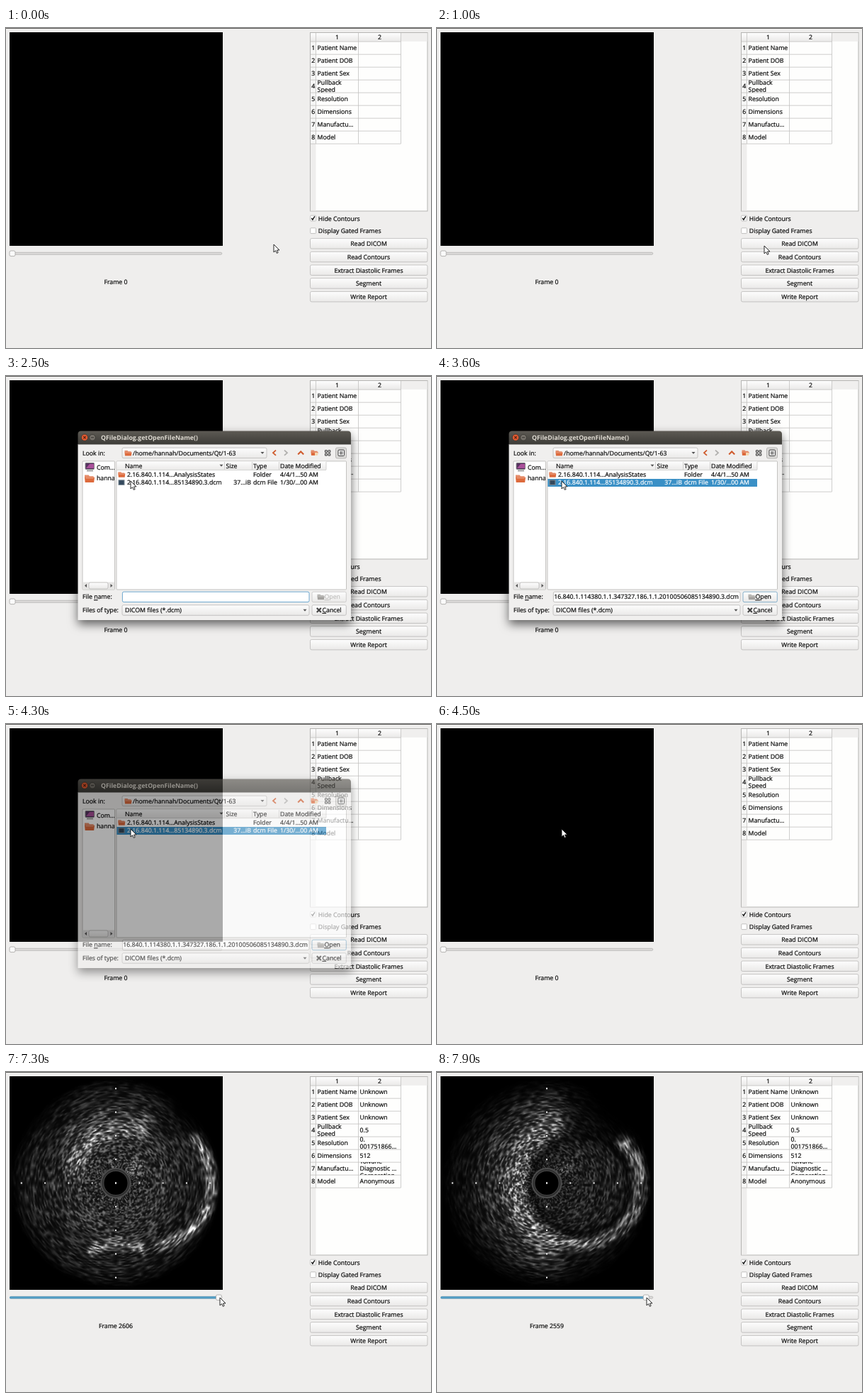
An HTML page with a canvas that plays this animation: 600x451 px, repeating every 8 s.

```html
<!DOCTYPE html>
<html lang="en">
<head>
<meta charset="utf-8">
<title>Ultrasound viewer</title>
<style>
html, body { margin: 0; width: 600px; height: 451px; overflow: hidden; background: #efeeed; }
canvas { position: absolute; left: 5px; top: 6px; background: #000; }
#stage { position: absolute; left: 0; top: 0; }
text { font: 8.75px "Open Sans", "Noto Sans", sans-serif; fill: #0c0c0c; stroke: #0c0c0c; stroke-width: .22; white-space: pre; text-rendering: geometricPrecision; }
.picked text { fill: #fff; stroke: #fff; }
.off text { fill: #b3b2b0; stroke: none; }
text.title { font-weight: 700; fill: #dfdbd2; stroke: none; }
#dialog { filter: drop-shadow(0 6px 7px rgba(0, 0, 0, .6)); }
</style>
</head>
<body>
<canvas id="scan" width="301" height="301"></canvas>
<svg id="stage" width="600" height="451" viewBox="0 0 600 451"></svg>
<script>
const $ = id => document.getElementById(id);
const text = (x, y, s, attrs = '') => `<text x="${x}" y="${y}" ${attrs}>${s}</text>`;
const rect = (x, y, w, h, fill, attrs = '') => `<rect x="${x}" y="${y}" width="${w}" height="${h}" fill="${fill}" ${attrs}/>`;
const line = (d, stroke, w = 1, attrs = '') => `<path d="${d}" fill="none" stroke="${stroke}" stroke-width="${w}" ${attrs}/>`;
const box = (x, y, w, h, fill = '#fff', stroke = '#b9b8b6', r = 2) => rect(x, y, w, h, fill, `stroke="${stroke}" stroke-width=".8" rx="${r}"`);
const button = (x, y, w, h = 14.5) => box(x, y, w, h, 'url(#face)');
const clip = (x, y, w, h, body) => `<svg x="${x}" y="${y}" width="${w}" height="${h}" viewBox="${x} ${y} ${w} ${h}">${body}</svg>`;
const down = (x, y) => `<path d="M${x - 2.5} ${y - 1.2}h5l-2.5 3z" fill="#555"/>`;
const middle = 'text-anchor="middle"', toEnd = 'text-anchor="end"';
const underline = c => `<tspan text-decoration="underline">${c}</tspan>`;
const folder = (x, y, size = 1, fill = '#dd6a3c') =>
  `<g transform="translate(${x} ${y}) scale(${size})"><path d="M0 1h4l1 1.3h4V4H0z" fill="${fill}" opacity=".75"/>` +
  `<path d="M0 3.4h10l-.6 5.1H.5z" fill="${fill}"/><path d="M1 4.2h8" stroke="#fff" stroke-width=".6" opacity=".5"/></g>`;

// ---- main window ----
const labels = ['Patient Name', 'Patient DOB', 'Patient Sex', 'Pullback|Speed', 'Resolution', 'Dimensions', 'Manufactu…', 'Model'];
const values = ['Unknown', 'Unknown', 'Unknown', '0.5', '0.|001751866…', '512', 'Tolvane|Diagnostic …|Corporation', 'Anonymous'];
const ROW = 18;

function cell(x, row, s) {
  const top = 19 + row * ROW, lines = s.split('|');
  const first = top + 12.2 - (lines.length - 1) * 5;
  return clip(x, top, 59, ROW, lines.map((l, i) => text(x + 2, first + i * 10, l)).join(''));
}
const column = (x, items) => items.map((s, i) => cell(x, i, s)).join('');

function table() {
  const numbers = labels.map((_, i) => text(433.8, 31.4 + i * ROW, i + 1, middle)).join('');
  const rules = labels.map((_, i) => `M430 ${37.2 + i * ROW}H557.5`).join('');
  return rect(429.5, 6.5, 165.5, 251.5, '#fefefd', 'stroke="#b5b4b2"') + rect(430, 7, 164.5, 12, '#f0efee') +
    rect(430, 19, 7.5, 238.5, '#efeeed') + rect(430, 7, 127.5, 12, 'url(#face)') + rect(430, 19, 7.5, 144, '#f6f6f5') +
    line('M437.5 7V163M497.5 7V163M557.5 7V163M430 19.2H557.5' + rules, '#c3c2c0', .8) +
    text(467.5, 16.3, 1, middle) + text(527.5, 16.3, 2, middle) + numbers +
    column(437.6, labels) + `<g id="values">${column(497.6, values)}</g>`;
}

const actions = ['Read DICOM', 'Read Contours', 'Extract Diastolic Frames', 'Segment', 'Write Report'].map((s, i) => {
  const y = 296.6 + i * 18.7;
  return button(429.5, y, 165.5) + text(512, y + 10.5, s, middle);
}).join('');
const checkbox = (y, s) => box(429.7, y, 7.8, 7.8, '#fff', '#b4b3b1', 1) + text(440.8, y + 7.5, s);

const mainWindow = rect(0, 0, 600, 1, '#5c5b58') + table() + checkbox(264.2, 'Hide Contours') + checkbox(281.8, 'Display Gated Frames') +
  line('M431.3 268l1.6 2.2 3-4.8', '#111', 1.4) + actions +
  box(5.4, 316.3, 299.4, 3, '#dcdbda', '#b4b3b1', 1.5) + rect(5, 316.2, 0, 3.3, '#529dc4', 'id="fill" rx="1.5"') +
  `<g id="handle">${box(-4, 314, 8, 7.6, '#fafafa', '#a5a4a2')}</g>` + text(155, 360.8, '', `id="label" ${middle}`);

// ---- file dialog ----
const columns = { Name: 171, Size: 346, Type: 349, 'Date Modified': 387 };

function fileRow(i, icon, cells) {
  const y = 142 + i * 11.4;
  const body = Object.values(columns).map((x, k) => text(x, y, cells[k], k === 1 ? toEnd : '')).join('');
  return `<g id="${icon}${i}">${icon === 'file' ? rect(159, y - 6.6, 8, 6.6, '#33485c', 'stroke="#7d8a94"') : folder(158.3, y - 7.8)}${body}</g>`;
}
const rootRows = [['__pycache__', '', 'Folder', '4/10/…03 AM'], ['1-63', '', 'Folder', '4/4/19 4:28 PM'], ['1-97', '', 'Folder', '4/4/1…57 AM']];

function fileList() {
  return box(156, 120, 324.5, 181, '#fff', '#b5b4b2', 1) + rect(156.5, 120.5, 295.5, 12, 'url(#face)') +
    line('M156.5 132.6H452M308.5 121V132M347.5 121V132M385.5 121V132M452 121V132', '#cbcac8', .8) +
    text(168, 130.2, 'Name') + text(310.5, 130.2, 'Size') + text(349, 130.2, 'Type') + text(387, 130.2, 'Date Modified') + down(304, 126) +
    rect(156.4, 145, 295.6, 11, '#3a90c6', 'id="selection"') +
    `<g id="root">${rootRows.map((r, i) => fileRow(i, 'dir', r)).join('')}</g><g id="sub">` +
    fileRow(0, 'sub', ['2.16.840.1.114…AnalysisStates', '', 'Folder', '4/4/1…50 AM']) +
    fileRow(1, 'file', ['2.16.840.1.114…85134890.3.dcm', '37…iB', 'dcm File', '1/30/…00 AM']) + '</g>';
}

const toolbar = line('M381 104.7l-4 3.6 4 3.6', '#aaa', 1.8, 'id="back"') + line('M393 104.7l4 3.6-4 3.6', '#b0afad', 1.8) +
  line('M412.2 110.5l4-4 4 4', '#cf5a2c', 2) + folder(430.5, 103.5) + rect(436, 108, 4, 4, '#f3d7b0') +
  line('M450.5 104.8h2.8v2.8h-2.8zm4.5 0h2.8v2.8H455zm-4.5 4.5h2.8v2.8h-2.8zm4.5 0h2.8v2.8H455z', '#333') +
  box(465.5, 101, 15, 15, '#dcdbd9', '#a9a8a6') + rect(469, 104.2, 8.4, 8.4, '#fff', 'stroke="#333" rx="1"') +
  line('M471 106.8h4.5m-4.5 1.7h4.5m-4.5 1.7h4.5', '#333', .9);

const sidebar = box(108, 120, 45.5, 181, '#fff', '#b5b4b2', 1) + rect(112, 122.5, 12.5, 9, '#55325f', 'rx="1" stroke="#888"') +
  '<path d="M113 130l5-6h6v6z" fill="#a9509a"/>' + rect(114, 132.6, 9, 1.8, '#999') + folder(111, 138, 1.4) +
  clip(108, 120, 45, 170, text(128, 131.8, 'Com…') + text(128, 147.4, 'hannah')) +
  rect(108.5, 290.5, 44.5, 10, '#e6e5e4') + button(117, 291, 27, 9) + '<path d="M114 293v5l-3-2.5zM147.5 293v5l3-2.5z" fill="#555"/>';

const titleBar = '<path d="M101.5 96.5V82q0-4.5 4.5-4.5H482.5q4.5 0 4.5 4.5V96.5z" fill="url(#bar)"/>' +
  '<circle cx="111" cy="86.7" r="4.6" fill="#e25a31" stroke="#33312d" stroke-width=".7"/>' + line('M109.3 85l3.4 3.4m0-3.4l-3.4 3.4', '#5a2413', 1.1) +
  '<circle cx="122" cy="86.7" r="4.3" fill="#75716a" stroke="#33312d" stroke-width=".7"/>' + line('M120 86.7h4', '#3b3935', 1.1) +
  text(134, 90, 'QFileDialog.getOpenFileName()', 'class="title"');

const dialog = rect(101.5, 96, 385.5, 248, '#f0efee') + titleBar + toolbar + sidebar + fileList() +
  text(108, 111.5, 'Look in:') + button(164, 101.2, 204) + folder(167.5, 104) + text(179, 111.5, '', 'id="path"') + down(362, 108.3) +
  text(108, 314.3, `File ${underline('n')}ame:`) + `<g id="field">${box(164.4, 304.2, 263.6, 14.4)}</g>` +
  clip(165.5, 304, 262, 15, text(426, 314.3, '', 'id="fileName"')) +
  `<g id="open">${button(432, 304.2, 48.3)}${folder(439.5, 306.8, 1, '#a3a19e')}${text(449.5, 314.3, underline('O') + 'pen')}</g>` +
  text(108, 333, 'Files of type:') + button(164, 322.8, 264) + text(168, 333, 'DICOM files (*.dcm)') + down(422, 330) +
  button(432, 322.8, 48.3) + line('M438.8 327l6 6m0-6l-6 6', '#444', 2.2) + text(446.5, 333, underline('C') + 'ancel');

$('stage').innerHTML = `<defs>
  <linearGradient id="face" x2="0" y2="1"><stop stop-color="#fdfdfd"/><stop offset="1" stop-color="#eae9e8"/></linearGradient>
  <linearGradient id="bar" x2="0" y2="1"><stop stop-color="#5d5a54"/><stop offset="1" stop-color="#3d3c38"/></linearGradient></defs>` +
  mainWindow + `<g id="dialog">${dialog}</g>` +
  '<path id="cursor" d="M0 0V11L2.6 8.7 4.3 12.4 6.1 11.6 4.5 8H8z" fill="#fff" stroke="#111" stroke-width=".9"/>';

// ---- ultrasound image: soft envelope times polar speckle ----
const CX = 155, CY = 156.5, SIZE = 301;

// Paints blurred arcs and discs; a negative level darkens.
function painter(g) {
  const shade = (level, blur) => {
    g.filter = `blur(${blur}px)`;
    g.fillStyle = g.strokeStyle = level > 0 ? `rgba(255,255,255,${level})` : `rgba(0,0,0,${-level})`;
    g.beginPath();
  };
  return {
    arc(level, x, y, r, from, to, width) {
      shade(level, width * .28);
      g.arc(x, y, r, from * Math.PI / 180, to * Math.PI / 180);
      g.lineWidth = width;
      g.stroke();
    },
    disc(level, x, y, r, blur) {
      shade(level, blur);
      g.arc(x, y, r, 0, 7);
      g.fill();
    },
  };
}

function wideVessel({ arc, disc }) {
  disc(.13, CX, CY, 138, 10);
  disc(.1, CX, CY, 85, 14);
  disc(-.9, 268, 40, 45, 14);
  disc(-.6, 30, 40, 50, 20);
  arc(.36, 167, 150, 72, 185, 295, 24);
  arc(.12, 160, 150, 95, 215, 300, 14);
  arc(.45, 203, 157, 88, -48, 85, 14);
  arc(.38, 160, 320, 79, 235, 300, 14);
}

function roundVessel({ arc, disc }) {
  disc(.07, CX, CY, 135, 12);
  arc(.14, 185, 158, 112, 95, 265, 34);
  disc(-.9, 262, 42, 50, 12);
  arc(.44, 200, 158, 90, 105, 255, 32);
  arc(.36, 203, 158, 84, -48, 110, 18);
  disc(-.85, 202, 160, 71, 3);
  disc(.14, 202, 160, 66, 5);
}

function envelope(paint) {
  const canvas = document.createElement('canvas');
  canvas.width = canvas.height = SIZE;
  const g = canvas.getContext('2d');
  g.fillRect(0, 0, SIZE, SIZE);
  g.translate(-5, -6);
  const brush = painter(g);
  paint(brush);
  brush.arc(.32, CX, CY, 33, -50, -32, 20);
  return g.getImageData(0, 0, SIZE, SIZE).data;
}

function randomizer(seed) {
  return () => {
    seed = seed + 0x6D2B79F5 | 0;
    let v = Math.imul(seed ^ seed >>> 15, 1 | seed);
    v = v + Math.imul(v ^ v >>> 7, 61 | v) ^ v;
    return ((v ^ v >>> 14) >>> 0) / 4294967296;
  };
}

const LAST = 2606, BETWEEN = 2583, FIRST = 2559;
const wide = envelope(wideVessel), round = envelope(roundVessel);

function scanImage(frame) {
  const mix = (LAST - frame) / (LAST - FIRST), spokes = 120;
  const noise = Float32Array.from({ length: spokes * 140 }, randomizer(frame));
  const at = (j, k) => noise[k * spokes + j % spokes];
  const lerp = (p, q, f) => p + (q - p) * f;
  const image = new ImageData(SIZE, SIZE);
  for (let y = 0, i = 0; y < SIZE; y++) for (let x = 0; x < SIZE; x++, i += 4) {
    const dx = x + 5.5 - CX, dy = y + 6.5 - CY, r = Math.hypot(dx, dy);
    const a = (Math.atan2(dy, dx) / (2 * Math.PI) + .5) * spokes, b = r / 1.8;
    const j = Math.floor(a), k = Math.floor(b);
    const n = lerp(lerp(at(j, k), at(j + 1, k), a - j), lerp(at(j, k + 1), at(j + 1, k + 1), a - j), b - k);
    const edge = Math.min(1, Math.max(0, (150 - r) / 8));
    image.data.fill(lerp(wide[i], round[i], mix) * edge * (.25 + 2.2 * n * n), i, i + 3);
    image.data[i + 3] = 255;
  }
  return image;
}

const scans = Object.fromEntries([LAST, BETWEEN, FIRST].map(f => [f, scanImage(f)]));
const scan = $('scan').getContext('2d');

function ring(r, fill, stroke, width) {
  scan.beginPath();
  scan.arc(CX - 5, CY - 6, r, 0, 7);
  scan.fillStyle = fill;
  scan.fill();
  scan.strokeStyle = stroke;
  scan.lineWidth = width;
  scan.stroke();
}

let shownFrame;
function drawScan(frame) {
  if (frame === shownFrame) return;
  shownFrame = frame;
  scan.clearRect(0, 0, SIZE, SIZE);
  if (!frame) return;
  scan.putImageData(scans[frame], 0, 0);
  ring(20.5, '#2a2a2a', '#4c4c4c', 2);
  ring(17.4, '#000', '#3c3c3c', 1.6);
  scan.fillStyle = '#f4f4f4';
  for (let k = -4; k <= 4; k++) {
    scan.fillRect(149 + k * 33.3, 149.5, 2, 2);
    scan.fillRect(149, 149.5 + k * 33.3, 2, 2);
  }
}

// ---- timeline ----
// Each move: start, end, and where the pointer comes to rest.
const moves = [[0, 500, 531, 156], [700, 1000, 462, 307], [1600, 1900, 187, 165], [1900, 2300, 176, 148], [5800, 6100, 67, 257],
  [6300, 7000, 322, 318], [7000, 7300, 302, 318], [7600, 7900, 296, 318]];
const clamp = v => Math.min(1, Math.max(0, v));

function cursorAt(t) {
  let x = 378, y = 305;
  for (const [start, end, toX, toY] of moves) {
    const p = clamp((t - start) / (end - start)), ease = p * p * (3 - 2 * p);
    x += (toX - x) * ease;
    y += (toY - y) * ease;
  }
  return [x, y];
}

const show = (id, on) => $(id).setAttribute('display', on ? 'inline' : 'none');

function renderDialog(t) {
  const opacity = Math.min(clamp((t - 1000) / 400), clamp((4500 - t) / 300));
  $('dialog').setAttribute('opacity', opacity);
  show('dialog', opacity > 0);
  const inside = t >= 2500, dirPicked = t >= 2300 && !inside, filePicked = t >= 3500;
  const name = t >= 3600 ? '2.16.840.1.114380.1.1.347327.186.1.1.20100506085134890.3.dcm' : dirPicked ? '1-63' : '';
  show('root', !inside);
  show('sub', inside);
  show('selection', dirPicked || filePicked);
  $('dir1').classList.toggle('picked', dirPicked);
  $('file1').classList.toggle('picked', filePicked);
  $('path').textContent = '/home/hannah/Documents/Qt' + (inside ? '/1-63' : '');
  $('back').setAttribute('stroke', inside ? '#cf5a2c' : '#aaa');
  $('fileName').textContent = name;
  $('fileName').setAttribute('x', dirPicked ? 168 : 426);
  $('fileName').setAttribute('text-anchor', dirPicked ? 'start' : 'end');
  $('field').firstChild.setAttribute('stroke', name ? '#b5b4b2' : '#4a94c4');
  $('open').firstChild.setAttribute('stroke', name ? '#6a9fc0' : '#c6c5c3');
  $('open').classList.toggle('off', !name);
}

function render(time) {
  const t = Math.floor(time % 8000 / 100) * 100;
  $('cursor').setAttribute('transform', `translate(${cursorAt(t)})`);
  renderDialog(t);
  const frame = t < 5900 ? 0 : t < 7700 ? LAST : t < 7900 ? BETWEEN : FIRST;
  const knob = 9 + 291.5 * frame / LAST;
  drawScan(frame);
  show('values', frame);
  $('label').textContent = 'Frame ' + frame;
  $('handle').setAttribute('transform', `translate(${knob} 0)`);
  $('fill').setAttribute('width', frame ? knob - 5 : 0);
}

const start = performance.now();
function tick() {
  render(performance.now() - start);
  requestAnimationFrame(tick);
}
tick();
</script>
</body>
</html>
```
